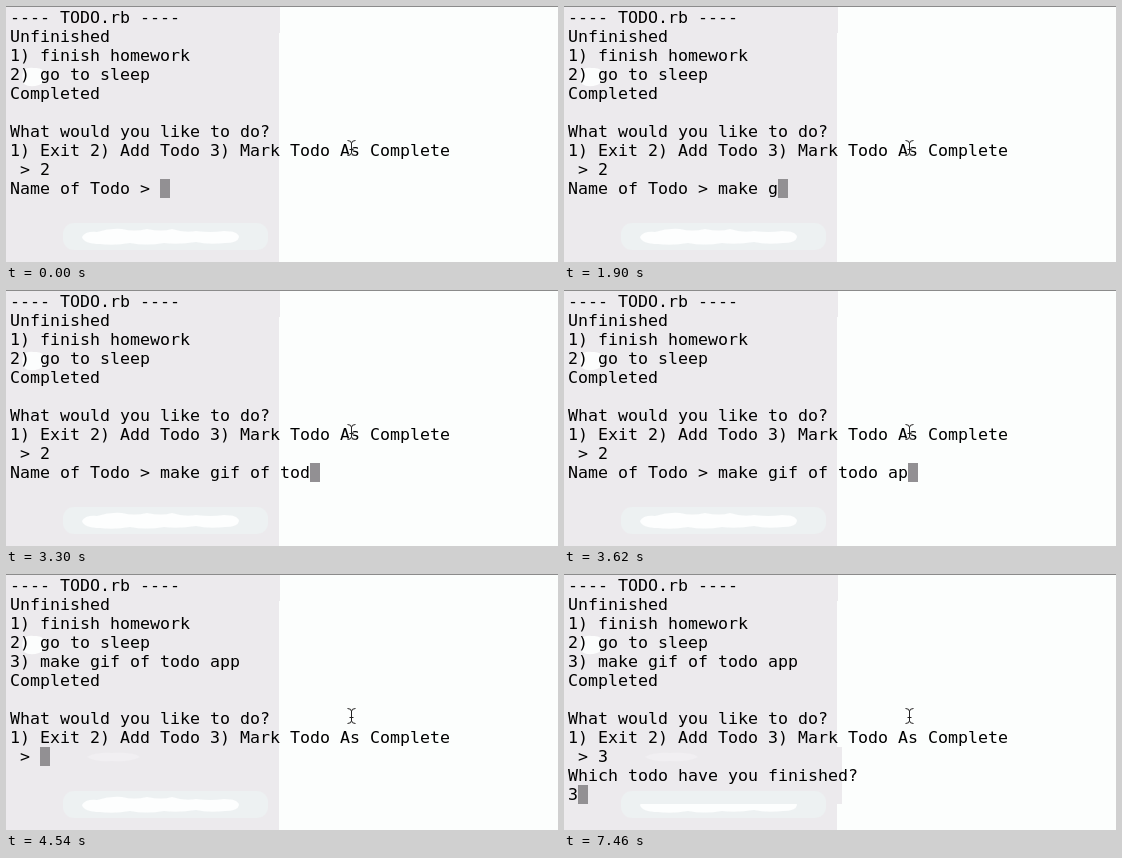
These frames come from a looping animation (552x256 px, 8000 ms). An HTML page:

```html
<!DOCTYPE html>
<html lang="en">
<head>
<meta charset="utf-8">
<title>Terminal todo list</title>
<style>
  html, body { margin: 0; width: 100%; height: 100%; overflow: hidden; background: #fcfefd; }
  svg { display: block; width: 552px; height: 256px; }
  text { font: 16.61px "DejaVu Sans Mono", monospace; fill: #000; white-space: pre; }
</style>
</head>
<body>
<svg viewBox="0 0 552 256">
  <defs>
    <clipPath id="lower"><rect y="230" width="552" height="26"/></clipPath>
  </defs>
  <rect width="552" height="256" fill="#fcfefd"/>
  <path d="M0 0H274V27H273V256H0Z" fill="#eceaed"/>
  <rect id="bulge" x="273" y="173" width="5" fill="#eceaed"/>
  <path d="M17 66Q19 61 28 62Q38 61 38 68Q39 77 33 79Q24 82 18 78Q15 72 17 66Z" fill="#fcfdfd"/>
  <path id="smudge" d="M81 183Q90 178 106 179Q128 178 134 183Q126 188 106 187Q88 188 81 183Z" fill="#f1eff2"/>
  <rect x="57" y="217" width="205" height="27" rx="11" fill="#edf1f2"/>
  <path id="scribble" fill="#fdfefe" d="M76 231Q79 225 91 226Q104 222 116 223Q128 226 141 223Q156 226 166 223Q178 227 190 225Q205 227 218 225Q232 225 233 231Q232 237 219 237Q202 239 190 236Q172 239 158 237Q140 240 124 237Q108 240 94 238Q78 238 76 231Z"/>
  <rect width="552" height="1" fill="#8b8b8b"/>
  <rect id="caret" width="10" height="19" fill="#929093"/>
  <g id="lines"></g>
  <g fill="none">
    <path d="M341.5 134.5Q345.5 134.5 345.5 137.5Q345.5 134.5 349.5 134.5M345.5 137V147M341.5 149.5Q345.5 149.5 345.5 146.5Q345.5 149.5 349.5 149.5M343 143.5H348" stroke="#fff" stroke-width="2.4" opacity=".6"/>
    <path d="M341.5 134.5Q345.5 134.5 345.5 137.5Q345.5 134.5 349.5 134.5M345.5 137V147M341.5 149.5Q345.5 149.5 345.5 146.5Q345.5 149.5 349.5 149.5M343.5 143.5H347.5" stroke="#222"/>
  </g>
</svg>
<script>
const LOOP = 8000, LEFT = 4, TOP = 2, COL = 10, ROW = 19, BASE = 15;
const ENTER = 4480, REDRAW = 4540, PICK = 6150, ASK = 6710, ANSWER = 7460;
const task = "make gif of todo app";
const keys = [1290, 1440, 1530, 1670, 1760, 1900, 1950, 2060, 2170, 2280,
  2390, 2530, 3100, 3150, 3300, 3330, 3430, 3520, 3620, 4030];
const $ = id => document.getElementById(id);

const rows = Array.from({ length: 12 }, (_, i) => {
  const el = document.createElementNS("http://www.w3.org/2000/svg", "text");
  el.setAttribute("x", LEFT);
  el.setAttribute("y", TOP + i * ROW + BASE);
  $("lines").append(el);
  return el;
});

// The last line returned is the one holding the caret.
function screen(t) {
  const todos = ["1) finish homework", "2) go to sleep"];
  if (t >= REDRAW) todos.push("3) " + task);
  const out = ["---- TODO.rb ----", "Unfinished", ...todos, "Completed", "",
    "What would you like to do?", "1) Exit 2) Add Todo 3) Mark Todo As Complete"];
  if (t < REDRAW) {
    const typed = keys.filter(k => t >= k).length;
    out.push(" > 2", "Name of Todo > " + task.slice(0, typed));
    if (t >= ENTER) out.push("");
  } else {
    out.push(" > " + (t >= PICK ? "3" : ""));
    if (t >= ASK) out.push("Which todo have you finished?", t >= ANSWER ? "3" : "");
  }
  return out;
}

function draw(t) {
  const out = screen(t);
  rows.forEach((el, i) => {
    const line = out[i] || "";
    if (el.textContent !== line) el.textContent = line;
  });
  const last = out.length - 1;
  $("caret").setAttribute("x", LEFT + out[last].length * COL);
  $("caret").setAttribute("y", TOP + last * ROW);

  const entered = t >= ENTER && t < REDRAW;
  $("bulge").setAttribute("height", t >= ASK ? 57 : entered ? 38 : 0);
  $("smudge").setAttribute("opacity", t >= REDRAW ? 1 : 0);
  $("scribble").setAttribute("clip-path", t >= ASK ? "url(#lower)" : "none");
}

const start = performance.now();
function tick() {
  draw((performance.now() - start) % LOOP);
  requestAnimationFrame(tick);
}
draw(0);
requestAnimationFrame(tick);
</script>
</body>
</html>
```
